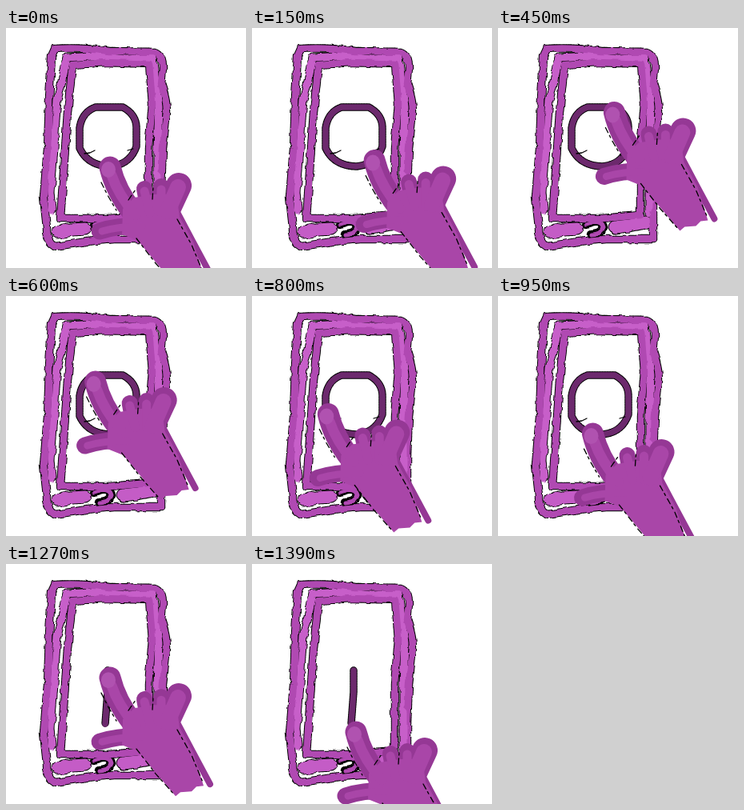
An HTML page without scripts for the animation above (1890 ms loop, 300 px wide and 300 px high).

```html
<!DOCTYPE html>
<html lang="en">
<head>
<meta charset="utf-8">
<title>Touch gestures</title>
<style>
  @property --turn { syntax: "<angle>"; inherits: false; initial-value: 0deg; }
  @property --drop { syntax: "<length>"; inherits: false; initial-value: 0px; }

  html, body { margin: 0; width: 100%; height: 100%; overflow: hidden; background: #fff; }
  svg { display: block; width: 100vw; height: 100vh; }
  path { fill: none; stroke-linecap: round; stroke-linejoin: round; }

  .edge { stroke: #000; stroke-dasharray: 2 1.2; stroke-linecap: butt; }
  .frame { stroke: #b048b2; stroke-width: 8.5; }
  .edge.frame { stroke: #000; stroke-width: 10.5; }
  .glow { stroke: #c75fc9; stroke-width: 9; }
  .edge.glow { stroke: #000; stroke-width: 11; }
  .blob { stroke: #c45cc6; stroke-width: 15; }
  .edge.blob { stroke: #000; stroke-width: 17; }
  .trace { stroke: #6c296d; stroke-width: 7.5; }
  .edge.trace { stroke: #000; stroke-width: 9.5; }

  .rim { stroke: #953895; }
  .skin { stroke: #a946a8; }
  .palm { fill: #a946a8; }
  .crease { stroke: #000; stroke-width: 1.3; stroke-dasharray: 7 4 3 5; }

  #hand {
    transform: translate(calc(36px * sin(var(--turn))),
                         calc(36px * cos(var(--turn)) - 36px + var(--drop)));
    animation: gesture 1890ms infinite;
  }
  #ring { animation: until 1890ms step-end infinite; }
  #line { animation: after 1890ms step-end infinite; }

  /* Circle the ring, lift to the top of the line, then swipe down. */
  @keyframes gesture {
    0%      { --turn: 0deg; --drop: 0px; animation-timing-function: step-end; }
    5.291%  { --turn: 0deg; --drop: 0px; animation-timing-function: steps(4, start); }
    15.873% { --turn: 80deg; --drop: 0px; animation-timing-function: steps(15, start); }
    55.555% { --turn: 360deg; --drop: 0px; animation-timing-function: steps(4, start); }
    66.136% { --turn: 360deg; --drop: -34px; animation-timing-function: step-end; }
    66.137% { --turn: 360deg; --drop: -54.5px; animation-timing-function: steps(8, start); }
    74.603%, 100% { --turn: 360deg; --drop: 36px; }
  }
  @keyframes until { 0% { visibility: visible; } 58.201%, 100% { visibility: hidden; } }
  @keyframes after { 0% { visibility: hidden; } 58.201%, 100% { visibility: visible; } }
</style>
</head>
<body>
<svg viewBox="0 0 300 300">
  <defs>
    <filter id="rough" filterUnits="userSpaceOnUse" x="0" y="0" width="300" height="300">
      <feTurbulence type="fractalNoise" baseFrequency=".09" numOctaves="2" seed="4"/>
      <feDisplacementMap in="SourceGraphic" scale="5" xChannelSelector="R" yChannelSelector="G"/>
    </filter>
    <path id="outer" d="M61 26 Q95 24 130 29 L186 30 Q196 34 196 50 L194 70 Q201 90 201 105 L196 150 L194 200 L194 264 L135 264 L100 267 L62 273 Q51 270 51 250 L47 212 L52 150 L54 90 L57 35 Z"/>
    <path id="middle" d="M58 226 L56 205 L60 150 L62 115 L64 90 L71 62 L76 37 L110 35 L150 39 L183 37 L187 65 L191 100 L189 150 L189 232"/>
    <path id="inner" d="M83 46 L125 43 L179 45 L183 95 L178 150 L178 234 L130 238 L68 238 L71 195 L74 150 L77 105 Z"/>
    <path id="base" d="M65 255 L82 252 L99 251 M146 249 L164 247 L184 243"/>
    <path id="button" d="M110 246 Q130 238 132 249 Q129 258 116 258"/>
    <path id="loop" d="M112 99 H146 Q163 108 163 125 V148 Q155 171 130 173 Q102 172 92 150 V125 Q95 105 112 99 Z"/>
    <path id="bar" d="M127 133 L127 160 L124 200"/>
  </defs>

  <g filter="url(#rough)">
    <use href="#outer" class="edge frame"/>
    <use href="#middle" class="edge glow"/>
    <use href="#inner" class="edge frame"/>
    <use href="#base" class="edge blob"/>
    <use href="#button" class="edge frame"/>
    <use href="#middle" class="glow"/>
    <use href="#base" class="blob"/>
    <use href="#outer" class="frame"/>
    <use href="#inner" class="frame"/>
    <use href="#button" class="frame" style="stroke-width:5"/>
    <path class="glow" d="M57 217 V228 M190 185 V225"/>
  </g>

  <g id="ring">
    <use href="#loop" class="edge trace"/>
    <use href="#loop" class="trace"/>
    <path d="M98 157 L105 156 L111 153 M152 153 L159 151" stroke="#000" stroke-width="1.3"/>
  </g>
  <g id="line">
    <use href="#bar" class="edge trace"/>
    <use href="#bar" class="trace"/>
  </g>

  <g id="hand">
    <g class="rim">
      <path stroke-width="27" d="M130 174 Q137 203 158 230"/>
      <path stroke-width="21" d="M117 254 Q138 247 168 247"/>
      <path stroke-width="20" d="M173 201 L178 228 M194 198 L194 228"/>
      <path stroke-width="32" d="M216 197 L203 225"/>
      <path stroke-width="8" d="M215 232 L233 266 L255 307"/>
    </g>
    <path class="palm" d="M146 226 L160 212 L185 208 L213 208 L217 236 L234 267 L247 309 L238 310 L232 316 L218 317 L212 322 L190 296 L165 266 L145 258 Z"/>
    <g class="skin">
      <path stroke-width="13" d="M132 184 Q140 208 162 234"/>
      <path stroke-width="9" d="M120 254 Q140 248 170 248"/>
      <path stroke-width="11" d="M173 204 L180 232 M194 202 L194 232"/>
      <path stroke-width="20" d="M215 199 L202 229"/>
    </g>
    <ellipse cx="128" cy="177" rx="9" ry="10" fill="#b052b0"/>
    <path class="crease" d="M119 193 L127 209 L138 228 M153 215 L162 202 M183 214 L184 199 M163 263 L187 294 L211 321 M214 239 L232 271 L247 307"/>
  </g>
</svg>
</body>
</html>
```
